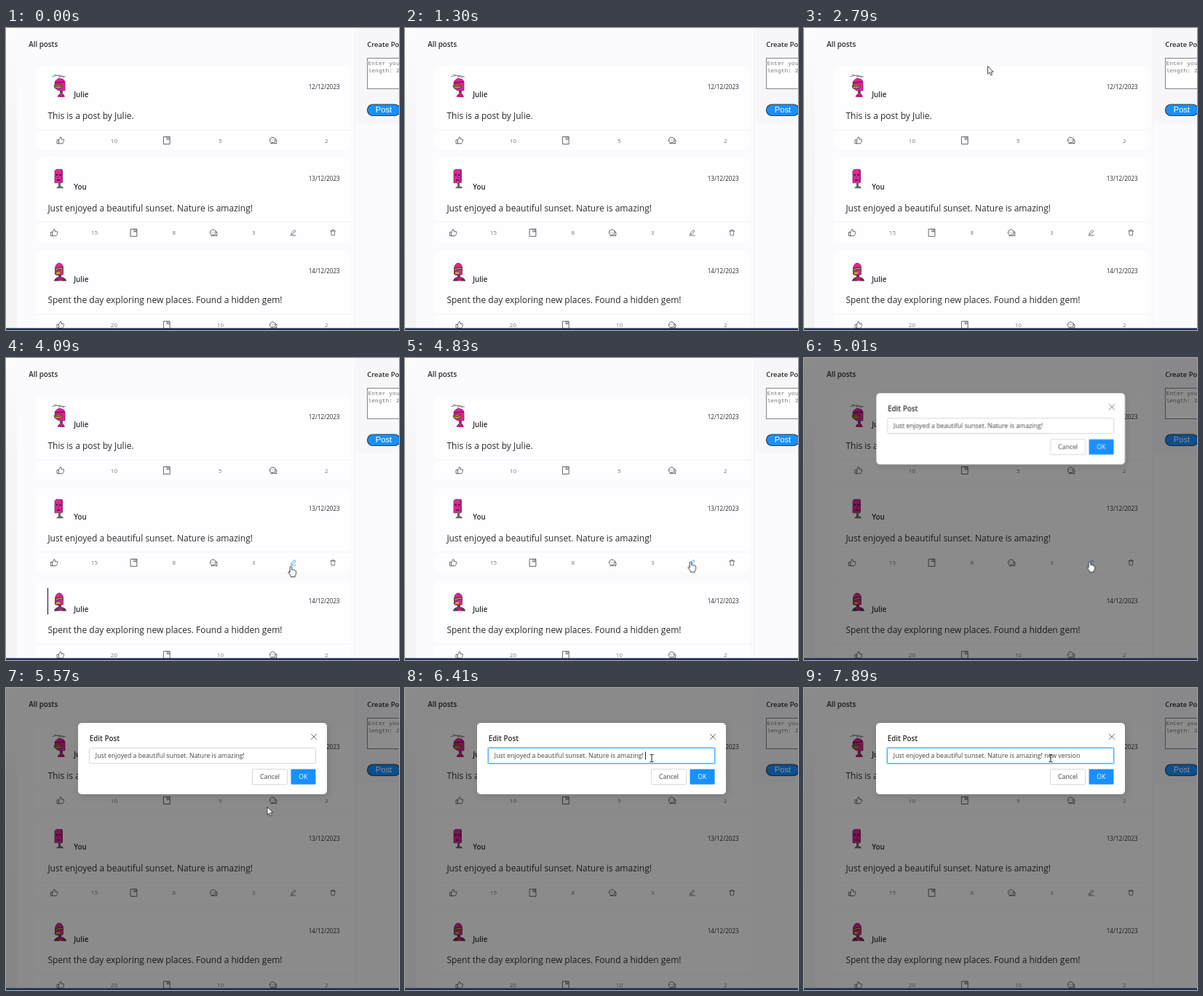
An HTML page for the animation above (8 s loop, 540 px wide and 415 px high).

```html
<!DOCTYPE html>
<html lang="en">
<head>
<meta charset="utf-8">
<title>Edit post</title>
<style>
  html, body { margin: 0; width: 100%; height: 100%; overflow: hidden; background: #fbfafc; }
  svg { display: block; width: 540px; height: 415px; overflow: hidden; }
  text { font: 8.75px "Open Sans", "Noto Sans", sans-serif; fill: #2c2c2c; white-space: pre; }
  .bold { font-size: 9.8px; font-weight: 600; }
  .body { font-size: 12.03px; }
  .date { font-size: 8.1px; }
  .count { font-size: 8px; fill: #777; text-anchor: middle; }
  .hint { font: 8px "Liberation Mono", "DejaVu Sans Mono", monospace; fill: #777; }
  .post { font: 11.2px "Liberation Sans", Arial, sans-serif; fill: #fff; }
  .icon { fill: none; stroke: #555; stroke-width: .9; stroke-linejoin: round; stroke-linecap: round; }
  .line { stroke: #f3f2f4; }

  .edit, .caret, .mask, .modal, .ring, .cursor, .arrow, .hand, .beam { animation: 8s linear infinite; }

  .edit { animation-name: edit; animation-timing-function: step-end; }
  @keyframes edit { 0%, 65% { stroke: #555; } 45.25% { stroke: #1890ff; } }

  .caret { animation-name: caret; animation-timing-function: step-end; }
  @keyframes caret { 0%, 57% { opacity: 0; } 51.1% { opacity: 1; } }

  .mask { animation-name: fade; }
  .modal { animation-name: zoom; transform-origin: 393px 287px; }
  @keyframes fade {
    0% { opacity: 0; }
    60.4% { opacity: 0; animation-timing-function: cubic-bezier(.25, .75, .5, 1); }
    62.6%, 100% { opacity: 1; }
  }
  @keyframes zoom {
    0% { opacity: 0; transform: scale(.2); }
    60.42% { opacity: 0; transform: scale(.2); animation-timing-function: cubic-bezier(.08, .82, .17, 1); }
    62.92%, 100% { opacity: 1; transform: scale(1); }
  }

  .ring { animation-name: ring; }
  @keyframes ring { 0%, 74% { opacity: 0; } 76%, 100% { opacity: 1; } }

  .cursor { animation-name: move; }
  @keyframes move {
    0%, 34.86% { transform: translate(252px, 52px); visibility: hidden; }
    34.87% { transform: translate(252px, 52px); visibility: visible; animation-timing-function: ease-in-out; }
    43% { transform: translate(383px, 294px); animation-timing-function: ease-out; }
    48.75%, 51.2% { transform: translate(391.5px, 286px); }
    57%, 65% { transform: translate(392.5px, 279.5px); animation-timing-function: ease-in-out; }
    73%, 100% { transform: translate(339px, 96px); visibility: visible; }
  }
  .arrow, .hand, .beam { animation-timing-function: step-end; }
  .arrow { animation-name: arrow; }
  .hand { animation-name: hand; }
  .beam { animation-name: beam; }
  @keyframes arrow { 0%, 65% { opacity: 1; } 45.25%, 71.5% { opacity: 0; } }
  @keyframes hand { 0%, 65% { opacity: 0; } 45.25% { opacity: 1; } }
  @keyframes beam { 0% { opacity: 0; } 71.5%, 100% { opacity: 1; } }
</style>
</head>
<body>
<svg viewBox="0 0 540 415">
  <defs>
    <linearGradient id="side" x2="0" y2="1">
      <stop stop-color="#fcfcfd"/><stop offset=".35" stop-color="#f5f5f6"/><stop offset="1" stop-color="#f3f3f4"/>
    </linearGradient>
    <filter id="shadow" x="-10%" y="-20%" width="120%" height="150%">
      <feDropShadow dy="3" stdDeviation="5" flood-opacity=".12"/>
    </filter>

    <path id="like" d="M-4.5 -.7h2v5h-2zM-2.5 -.7L-.3 -4.8Q1.6 -4.7 1 -1.5H4.2Q5 -.8 4.3 .4Q4.6 1.3 3.9 2Q4 3 3.2 3.4Q3.2 4.3 2.2 4.3H-2.5"/>
    <path id="book" d="M-4.2 -5h8.4v10h-8.4zM.3 -5v4l1.3 -1l1.3 1v-4"/>
    <path id="chat" d="M3.1 3.8Q1.3 4.8 -.6 4L-3 4.5L-2.9 3A4 4 0 1 1 2.8 1.7Q1 3.4 -1.6 3M2.9 -2.2A3.5 3.5 0 0 1 4.5 3L4.7 4.6L3.1 3.8M-3 -.5h.1M-.8 -.5h.1M1.4 -.5h.1"/>
    <path id="pen" d="M-4 4.2h8M-2.8 2.4L-2.4 .2L2 -4.2L3.8 -2.4L-.6 2z"/>
    <path id="bin" d="M-4 -2.8h8M-1.6 -2.8v-1.5h3.2v1.5M-3 -2.8l.4 7h5.2l.4 -7"/>

    <g id="robot0">
      <path d="M-10 -12.5L0 -14L9 -12M-7 -15L7 -11M0 -13v4" fill="none" stroke="#888"/>
      <path d="M-6 -4Q-4 -10 2 -9.5Q7 -9 8 -5V7H-1L-5 4z" fill="#e91e9c" stroke="#7d1457" stroke-width=".7"/>
      <path d="M-6 -5L8 -6V-4L-6 -2.5z" fill="#8c1c66"/>
      <path d="M-7 0Q-2 -2 4 -.5V3Q-1 5 -6 3.5z" fill="#d9a441" stroke="#3a2030" stroke-width=".8"/>
      <path d="M-6 1.2L3 1" stroke="#222"/>
      <path d="M1 7h4v4H1z" fill="#555"/>
      <path d="M-2 16Q-1 11 3 10.5Q7 11 8 16z" fill="#e91e9c"/>
      <path d="M-2 15l3 -3M2 16v-3M5 12v4" stroke="#4b2140"/>
    </g>
    <g id="robot1">
      <path d="M-6 -9.5L-4 -11.5H4V7H-6z" fill="#e0249a" stroke="#76305d" stroke-width=".8"/>
      <path d="M3 -11.5L5 -10V6L3 7z" fill="#9b276f"/>
      <path d="M-4.5 -5h2.5v2h-2.5zM0 -5h2.5v2H0zM-3 2.5h4.5v1.5H-3z" fill="#3c1d33"/>
      <path d="M-1.2 -2h1v3h-1z" fill="#8d2467"/>
      <path d="M-1 7h3v6h-3z" fill="#666"/>
      <path d="M-4 14.5Q-2 11 1 11.5Q5 11 6 14.5z" fill="#666"/>
    </g>
    <g id="robot2">
      <path d="M-5.5 6V-3Q-4 -9.5 0 -9.5Q5 -9 5.5 -3V6Q1 9 -5.5 6z" fill="#e32594" stroke="#8a1d5e" stroke-width=".8"/>
      <path d="M-6 -2Q0 -6 6 -4V0Q0 0 -6 2z" fill="#6d3b50"/>
      <path d="M-5 0Q0 -3 5 -2" stroke="#c99a3e" stroke-width="1.2" fill="none"/>
      <path d="M-5 3Q0 1 3 3.5L0 6H-4z" fill="#d9a441" stroke="#4a1c36" stroke-width=".6"/>
      <path d="M-1 7h4v4h-4z" fill="#444"/>
      <path d="M-7 15Q-5 9 1 9.5Q8 9 10 15z" fill="#b81f78"/>
      <path d="M-7 15Q-5 10 -2 11L0 15zM4 15L5 10.5Q9 11 10 15z" fill="#4a4148"/>
    </g>
  </defs>

  <rect width="540" height="415" fill="#fbfafc"/>
  <rect width="15" height="415" fill="url(#side)"/>
  <rect x="480" width="60" height="131" fill="#f7f6f8"/>
  <path d="M479.5 4V415" stroke="#f2f1f3"/>
  <text class="bold" x="31.2" y="26.3">All posts</text>
  <g id="cards"></g>

  <text class="bold" x="496.2" y="26.3" style="font-size:9.5px">Create Post</text>
  <rect x="496.5" y="41.5" width="120" height="42" fill="#fff" stroke="#858585"/>
  <text class="hint" x="497.5" y="50.5">Enter your</text>
  <text class="hint" x="497.5" y="60.5">length: 20</text>
  <rect x="496.5" y="105" width="45" height="15.5" rx="7.75" fill="#1890ff" stroke="#3a3f48" stroke-width="1.2"/>
  <text class="post" x="507.8" y="116.3">Post</text>

  <path class="caret" d="M57.5 316V352.5" stroke="#111"/>
  <rect class="mask" width="540" height="415" fill="#000" fill-opacity=".45"/>

  <g class="modal">
    <rect x="99" y="48" width="342" height="98" rx="5" fill="#fff" filter="url(#shadow)"/>
    <text class="bold" x="114.8" y="73.2">Edit Post</text>
    <path d="M419 63l8 8m0 -8l-8 8" stroke="#777"/>
    <rect x="114.5" y="82.5" width="311" height="21" rx="1" fill="#fff" stroke="#d9d9d9"/>
    <g class="ring" fill="none">
      <rect x="113.5" y="81.5" width="313" height="23" rx="2" stroke="#1890ff" stroke-opacity=".28" stroke-width="1.6"/>
      <rect x="114.5" y="82.5" width="311" height="21" rx="1" stroke="#40a9ff"/>
    </g>
    <text id="field" x="122.8" y="96.4" style="fill:#444"></text>
    <path id="bar" d="M.5 87.5V98.5" stroke="#222"/>
    <rect x="338.5" y="111.5" width="48" height="21" rx="1" fill="#fff" stroke="#d9d9d9"/>
    <text x="349" y="125.4" style="fill:#444">Cancel</text>
    <rect x="391.5" y="111.5" width="34" height="21" rx="1" fill="#1890ff"/>
    <text x="402.3" y="125.4" style="fill:#fff">OK</text>
  </g>

  <g class="cursor">
    <path class="arrow" d="M.5 .5V11.3L3 9L4.8 13L6.6 12.2L4.9 8.3H8.2z" fill="#fff" stroke="#222" stroke-width=".8"/>
    <path class="hand" d="M-1.3 1.3Q0 -.5 1.3 1.3V5Q2.6 4.2 3.5 5.4Q4.8 4.8 5.5 6Q7 5.7 7 7.3V10.5Q6.8 12.3 5.6 13V14.8H-.2V13.3L-3.4 9Q-3.5 7.5 -2.3 7.6L-1.3 8.6z" fill="#fff" stroke="#222" stroke-width=".9"/>
    <path class="beam" d="M-2.5 -4.5H-1Q0 -4.5 0 -3.5Q0 -4.5 1 -4.5H2.5M0 -3.5V4.5M-2.5 5.5H-1Q0 5.5 0 4.5Q0 5.5 1 5.5H2.5" fill="none" stroke="#222"/>
  </g>
  <rect y="412.4" width="540" height="2.6" fill="#1c2f57"/>
</svg>

<script>
  const sunset = 'Just enjoyed a beautiful sunset. Nature is amazing!';
  const posts = [
    { name: 'Julie', date: '12/12/2023', body: 'This is a post by Julie.', counts: [10, 5, 2] },
    { name: 'You', date: '13/12/2023', body: sunset, counts: [15, 8, 3], own: true },
    { name: 'Julie', date: '14/12/2023', body: 'Spent the day exploring new places. Found a hidden gem!', counts: [20, 10, 2] },
  ];

  const icon = (id, x, extra = '', scale = 1) =>
    `<g class="icon ${extra}" transform="translate(${x} 101.5) scale(${scale})"><use href="#${id}"/></g>`;

  function card(post, index) {
    const pitch = post.own ? 54.7 : 73;
    const start = post.own ? 66.3 : 75;
    const cell = n => start + n * pitch;
    const stats = ['like', 'book', 'chat'].map((id, i) =>
      icon(id, cell(2 * i)) +
      `<text class="count" x="${cell(2 * i + 1) + .4}" y="104.5">${post.counts[i]}</text>`).join('');
    const tools = post.own ? icon('pen', cell(6), 'edit', .9) + icon('bin', cell(7), '', .85) : '';
    return `<g transform="translate(0 ${53 + index * 126.8})">
      <rect x="41" y="-.5" width="433" height="115" rx="7" fill="#fefdff"/>
      <use href="#robot${index}" x="73" y="26"/>
      <text class="bold" x="93.2" y="42">${post.name}</text>
      <text class="date" x="415.7" y="30.5">${post.date}</text>
      <text class="body" x="57.4" y="71.8">${post.body}</text>
      <path class="line" d="M41 87H474"/>
      ${stats}${tools}
    </g>`;
  }
  document.getElementById('cards').innerHTML = posts.map(card).join('');

  const field = document.getElementById('field');
  const bar = document.getElementById('bar');
  const clock = document.querySelector('.cursor').getAnimations()[0];
  const typed = ' new version';
  const keyTimes = [6360, 6460, 6550, 6740, 6830, 7110, 7200, 7390, 7480, 7670, 7760, 7840];

  function draw() {
    const t = clock.currentTime % 8000;
    const content = sunset + typed.slice(0, keyTimes.filter(k => t >= k).length);
    if (field.textContent !== content) field.textContent = content;
    bar.style.visibility = t > 6000 && t < 7840 ? 'visible' : 'hidden';
    bar.setAttribute('transform', `translate(${Math.round(122.5 + field.getComputedTextLength())} 0)`);
    requestAnimationFrame(draw);
  }
  draw();
</script>
</body>
</html>
```
